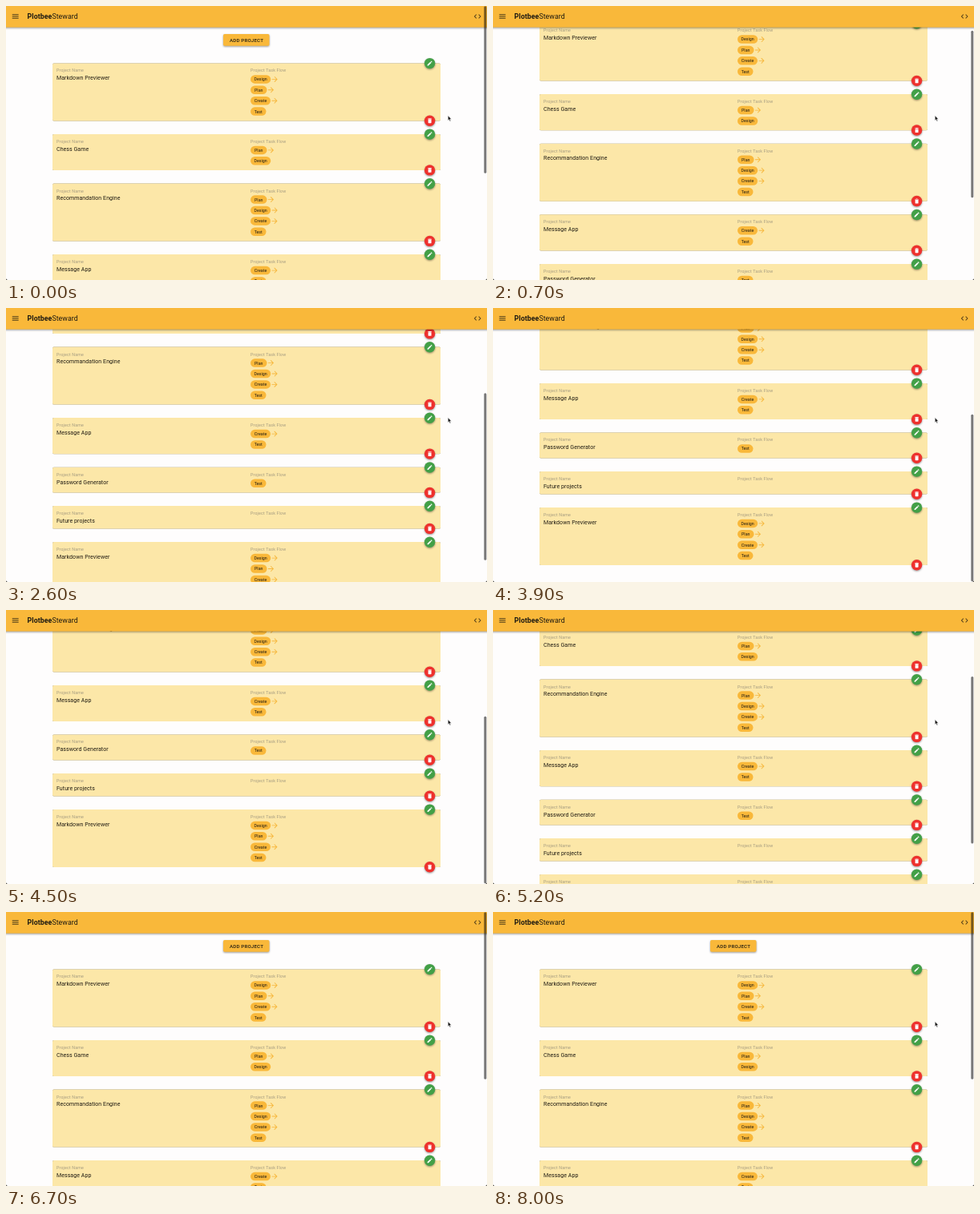
An HTML page for the animation above (8100 ms loop, 600 by 342 pixels).

```html
<!DOCTYPE html>
<html lang="en">
<head>
<meta charset="utf-8">
<title>Projects</title>
<style>
html, body { margin: 0; width: 100%; height: 100%; overflow: hidden; background: #fefdfd; }
svg { display: block; width: 600px; height: 342px; font-family: Roboto, sans-serif; fill: #1f1b12; }
.amber { fill: #f9b83a; }
.card { fill: #fce7a8; filter: drop-shadow(0 .7px .6px rgba(0,0,0,.5)); }
.raised { filter: drop-shadow(0 1px 1px rgba(0,0,0,.4)); }
.label { font-size: 5.27px; letter-spacing: .03333em; fill: #a49b80; }
.name { font-size: 7.03px; letter-spacing: .00938em; }
.chip { font-size: 5.3px; text-anchor: middle; }
.add { font-size: 6.15px; font-weight: 500; letter-spacing: .02857em; text-anchor: middle; }
.brand { font-size: 8.78px; letter-spacing: .0075em; }
</style>
</head>
<body>
<svg id="stage" viewBox="0 0 600 342"></svg>
<script>
const ICONS = {
  menu: "M3 18h18v-2H3zM3 13h18v-2H3zM3 6v2h18V6z",
  code: "M9.4 16.6 4.8 12l4.6-4.6L8 6l-6 6 6 6zM14.6 16.6l4.6-4.6-4.6-4.6L16 6l6 6-6 6z",
  arrow: "M12 4l-1.41 1.41L16.17 11H4v2h12.17l-5.58 5.59L12 20l8-8z",
  edit: "M3 17.25V21h3.75L17.81 9.94l-3.75-3.75zM20.71 7.04c.39-.39.39-1.02 0-1.41l-2.34-2.34c-.39-.39-1.02-.39-1.41 0l-1.83 1.83 3.75 3.75z",
  trash: "M6 19c0 1.1.9 2 2 2h8c1.1 0 2-.9 2-2V7H6zM19 4h-3.5l-1-1h-5l-1 1H5v2h14z"
};
const CHIP_WIDTH = { Design: 25.2, Plan: 20.5, Create: 25, Test: 19.5 };
const PROJECTS = [
  ["Markdown Previewer", "Design Plan Create Test"],
  ["Chess Game", "Plan Design"],
  ["Recommandation Engine", "Plan Design Create Test"],
  ["Message App", "Create Test"],
  ["Password Generator", "Test"],
  ["Future projects", ""],
  ["Markdown Previewer", "Design Plan Create Test"]
];

const text = (x, y, cls, s) => `<text x="${x}" y="${y}" class="${cls}">${s}</text>`;
const rect = (x, y, w, h, r, cls) =>
  `<rect x="${x}" y="${y}" width="${w}" height="${h}" rx="${r}" class="${cls}"/>`;
const icon = (name, x, y, scale, fill) =>
  `<path d="${ICONS[name]}" fill="${fill}" transform="translate(${x} ${y}) scale(${scale}) translate(-12 -12)"/>`;
const fab = (y, name, fill) =>
  `<circle cx="528.6" cy="${y}" r="6.7" fill="${fill}" class="raised"/>` + icon(name, 528.6, y, .33, "#fff");

function chip(task, y, last) {
  const w = CHIP_WIDTH[task];
  return rect(305, y - 5.25, w, 10.5, 5.25, "amber") +
    text(305 + w / 2, y + 1.9, "chip", task) +
    (last ? "" : icon("arrow", 305 + w + 5, y, .439, "#f6b73c"));
}

function card([name, flow], top) {
  const tasks = flow ? flow.split(" ") : [];
  const height = tasks.length ? 18.4 + 13.4 * tasks.length : 28.5;
  const svg = rect(58, top, 484, height, 1.7, "card") +
    text(63, top + 10.9, "label", "Project Name") +
    text(63, top + 20.7, "name", name) +
    text(305, top + 10.9, "label", "Project Task Flow") +
    tasks.map((t, i) => chip(t, top + 20 + 13.4 * i, i === tasks.length - 1)).join("") +
    fab(top + .2, "edit", "#43a047") + fab(top + height - .2, "trash", "#ee312d");
  return { svg, height };
}

let top0 = 71.4, page = rect(271, 35, 57.5, 14.8, 1.7, "amber raised") +
  text(300, 44.6, "add", "ADD PROJECT");
for (const p of PROJECTS) {
  const c = card(p, top0);
  page += c.svg;
  top0 += c.height + 16.5;
}

document.getElementById("stage").innerHTML = `
  <g id="page">${page}</g>
  <rect x="-5" y="-5" width="610" height="31.6" class="amber raised"/>
  ${icon("menu", 11.7, 13, .439, "#4d3c1a")}
  ${icon("code", 588.2, 13, .439, "#4d3c1a")}
  <text x="26.6" y="16" class="brand"><tspan font-weight="700">Plotbee</tspan>Steward</text>
  <rect id="thumb" x="596.3" width="3" height="208.5" rx="1.5" fill="#000" fill-opacity=".53"/>
  <path d="M551.3 136.8v6.2l1.4-1.3 1 2.2 1-.5-1-2.1h1.9z" fill="#111" stroke="#fff" stroke-width=".5"/>
  <path d="M0 339.5V342H2.5A2.5 2.5 0 0 1 0 339.5zM600 339.5V342H597.5A2.5 2.5 0 0 0 600 339.5z"/>`;

// Scroll position: [ms, px]
const KEYS = [[0, 0], [1300, 91.4], [2600, 173], [3400, 216.2], [4500, 216.2],
  [5200, 135], [5900, 39.6], [6350, 0], [8100, 0]];

function slope(i) {
  const a = KEYS[i - 1], b = KEYS[i], c = KEYS[i + 1];
  if (!a) return .07;
  if (!c || a[1] === b[1] || b[1] === c[1]) return 0;
  return (c[1] - a[1]) / (c[0] - a[0]);
}

function scrollAt(t) {
  const i = KEYS.findIndex(k => k[0] > t) - 1;
  const [t0, y0] = KEYS[i], [t1, y1] = KEYS[i + 1];
  const d = t1 - t0, u = (t - t0) / d, v = 1 - u;
  return y0 * v * v * (1 + 2 * u) + y1 * u * u * (3 - 2 * u) +
    d * u * v * (v * slope(i) - u * slope(i + 1));
}

const pageGroup = document.getElementById("page");
const thumb = document.getElementById("thumb");
const start = performance.now();

function draw() {
  const t = (performance.now() - start) % 8100;
  const y = scrollAt(Math.floor(t / 100) * 100);
  pageGroup.setAttribute("transform", `translate(0 ${-y})`);
  thumb.setAttribute("y", .3 + y * .613);
  requestAnimationFrame(draw);
}
draw();
</script>
</body>
</html>
```
